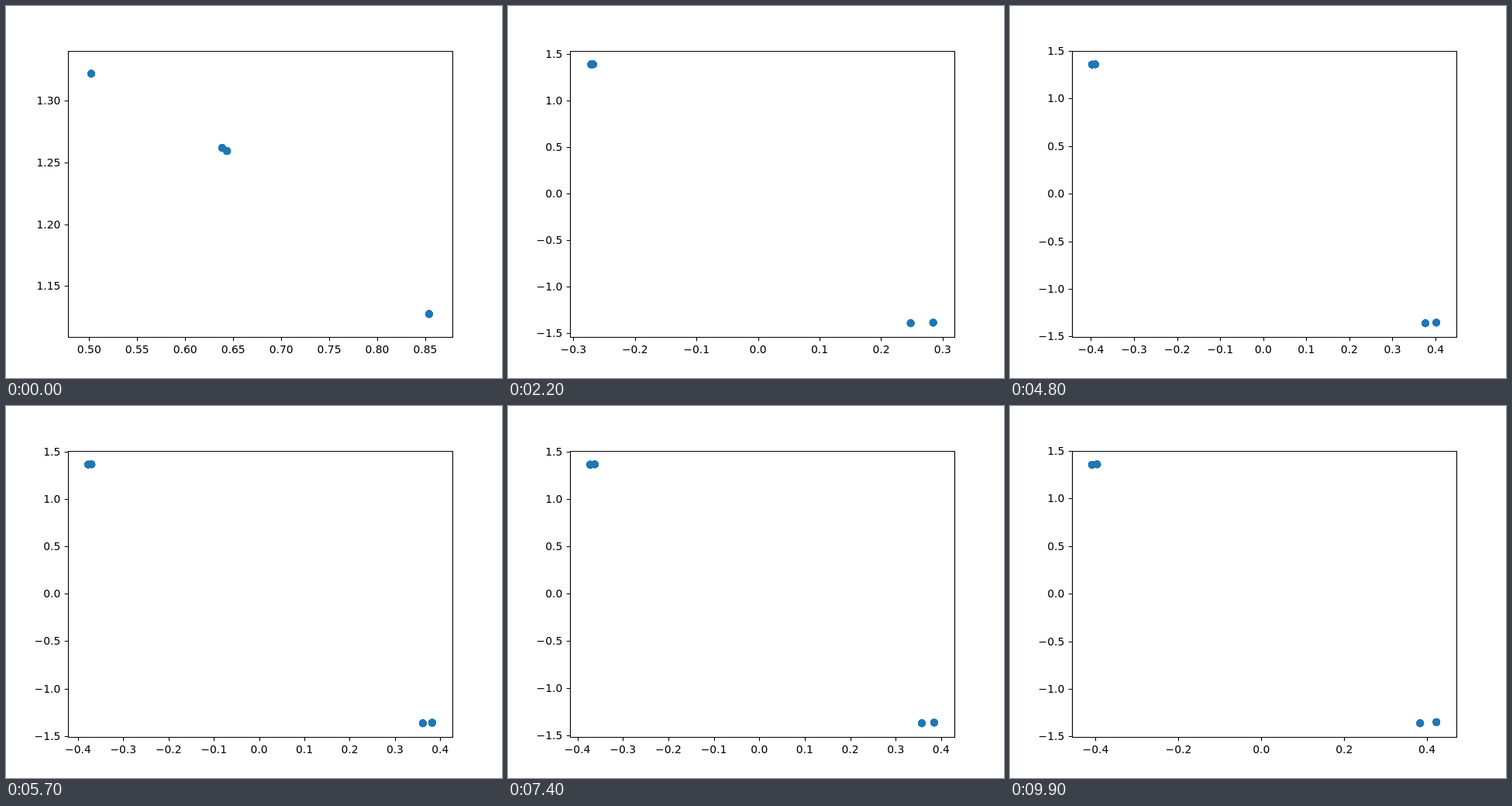
These frames come from a looping animation (640x480 px, 10000 ms). An HTML page:

```html
<!DOCTYPE html>
<html lang="en">
<head>
<meta charset="utf-8">
<title>Scatter plot</title>
<style>
  html, body { margin: 0; width: 100%; height: 100%; overflow: hidden; background: #fff; }
  svg { display: block; font: 13.889px "DejaVu Sans", sans-serif; }
  path { fill: none; stroke: #000; stroke-width: 1.11; }
  circle { fill: #1f77b4; }
</style>
</head>
<body>
<svg id="plot" width="640" height="480" viewBox="0 0 640 480"></svg>
<script>
const LOOP = 10000, STEP = 100, RADIUS = Math.SQRT2;
const LEFT = 80, RIGHT = 576, TOP = 57.6, BOTTOM = 427.2;
const plot = document.getElementById('plot');

// Time in ms, then each point's angle from straight up, in degrees
const KEYS = [
  [0, 20.8, 26.84, 27.07, 37.15],
  [300, 12, 16, 118, 112],
  [500, 3, 4, 176, 173],
  [1100, -5, -4.9, 175.4, 174.3],
  [2200, -11.05, -10.92, 169.9, 168.39],
  [3800, -14.54, -14.29, 166.24, 165.23],
  [4800, -16.32, -16.01, 164.56, 163.49],
  [6000, -15.2, -14.9, 165.4, 164.6],
  [6500, -15.98, -15.63, 164.85, 163.58],
  [7200, -15.1, -14.7, 165.5, 164.37],
  [8400, -15.95, -15.42, 164.65, 163.45],
  [9100, -14.9, -14.4, 165.6, 164.5],
  [9900, -16.8, -16.28, 164.27, 162.61]
];

function pointsAt(time) {
  const next = Math.max(1, KEYS.findIndex(key => key[0] >= time));
  const [t0, ...from] = KEYS[next - 1], [t1, ...to] = KEYS[next];
  const part = (time - t0) / (t1 - t0);
  return from.map((a, i) => {
    const angle = (a + (to[i] - a) * part) * Math.PI / 180;
    return [RADIUS * Math.sin(angle), RADIUS * Math.cos(angle)];
  });
}

// Fits the limits to the values plus a marker allowance and 5% margins
function fitAxis(values, start, end) {
  const pad = 3 / Math.abs(end - start);
  const min = Math.min(...values) - pad, max = Math.max(...values) + pad;
  const margin = (max - min) * 0.05;
  const low = min - margin, range = max - min + 2 * margin;
  const toPixel = v => start + (v - low) / range * (end - start);

  const rough = range / 9, power = 10 ** Math.floor(Math.log10(rough));
  const factor = [1, 2, 2.5, 5, 10].find(f => f * power >= rough);
  const step = factor * power;
  const digits = Math.max(0, -Math.floor(Math.log10(step) + 1e-9)) + (factor === 2.5 ? 1 : 0);
  const ticks = [];
  for (let n = Math.ceil(low / step); n * step <= low + range; n++) {
    const label = (n < 0 ? '\u2212' : '') + Math.abs(n * step).toFixed(digits);
    ticks.push({ at: toPixel(n * step), label });
  }
  return { toPixel, ticks };
}

const snap = v => Math.floor(v + 0.5) + 0.5;
const text = (x, y, anchor, label) => `<text x="${x}" y="${y}" text-anchor="${anchor}">${label}</text>`;

function draw(time) {
  const points = pointsAt(time);
  const xAxis = fitAxis(points.map(p => p[0]), LEFT, RIGHT);
  const yAxis = fitAxis(points.map(p => p[1]), BOTTOM, TOP);
  let lines = 'M80.5 58.5H576.5V427.5H80.5Z', labels = '', dots = '';

  for (const { at, label } of xAxis.ticks) {
    lines += `M${snap(at)} 427.5v4.86`;
    labels += text(at, 448, 'middle', label);
  }
  for (const { at, label } of yAxis.ticks) {
    lines += `M80.5 ${snap(at)}h-4.86`;
    labels += text(70.3, Math.round(at + 5), 'end', label);
  }
  // Many coincident markers give each dot its hard edge
  for (const [x, y] of points) {
    dots += `<circle cx="${xAxis.toPixel(x)}" cy="${yAxis.toPixel(y)}" r="4.86"/>`.repeat(8);
  }
  plot.innerHTML = dots + `<path d="${lines}"/>` + labels;
}

let shown = -1;
function tick() {
  const time = Math.floor(performance.now() % LOOP / STEP) * STEP;
  if (time !== shown) draw(shown = time);
  requestAnimationFrame(tick);
}
tick();
</script>
</body>
</html>
```
